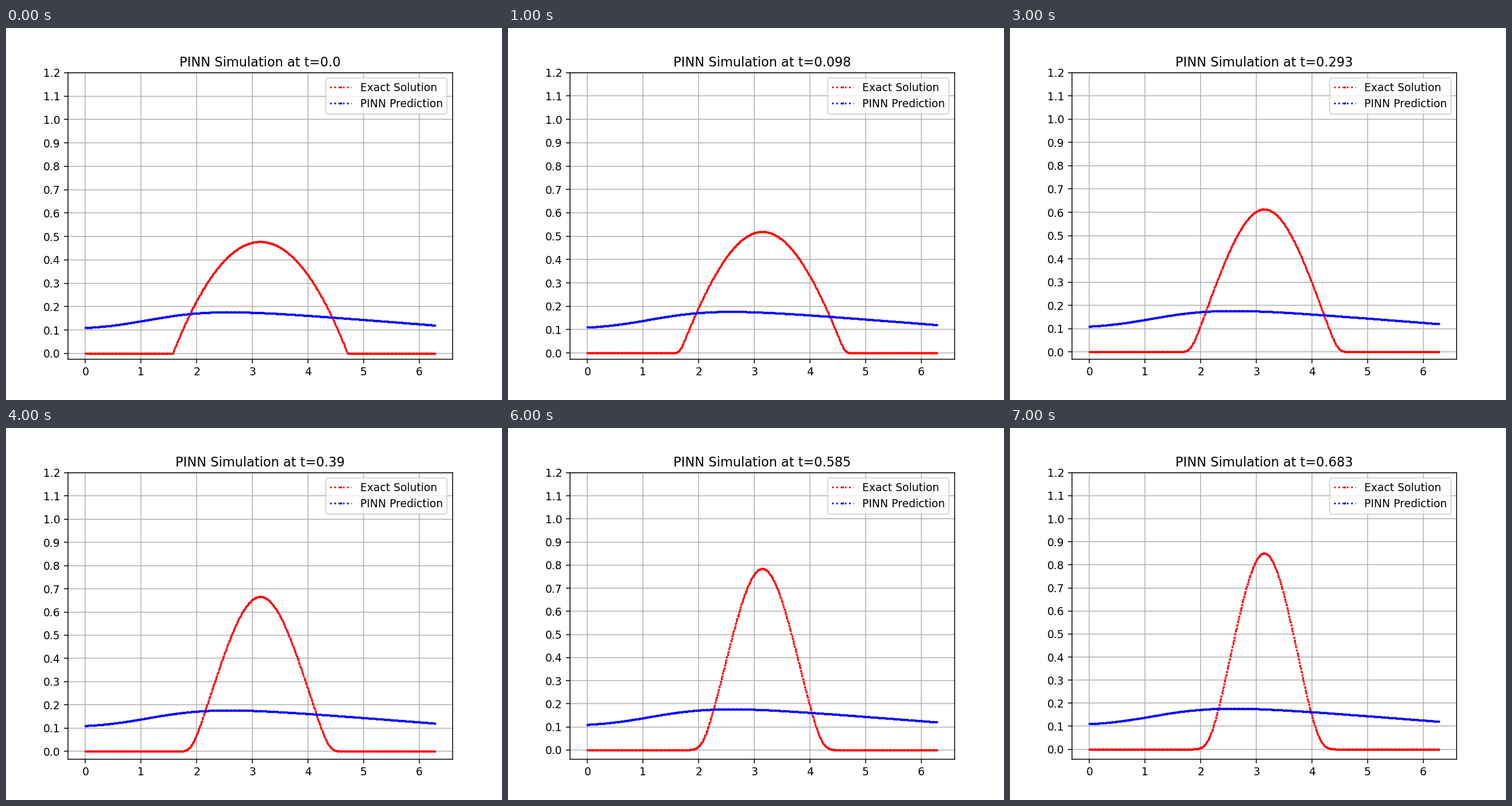
Recreate the animation shown at these times as a matplotlib script. Size 864 by 648 pixels, loop 8000 ms.

```python
import numpy as np
import matplotlib.pyplot as plt
from matplotlib.animation import FuncAnimation

STEP = 4 / 41        # simulated time between frames
FRAMES = 8
SPEED, DIFF = 0.871, 0.013
SUBSTEPS = 100

x = np.linspace(0, 2 * np.pi, 512)


def start_density():
    a = np.pi / 2
    return np.maximum(0, 3 / (4 * a) * (1 - ((x - np.pi) / a) ** 2))


def simulate():
    """Density drifting towards pi with a little diffusion."""
    dt = STEP / SUBSTEPS
    dx = x[1] - x[0]
    drift = SPEED * np.sin((x[1:] + x[:-1]) / 2)
    u = start_density()
    states = [u.copy()]
    for _ in range(FRAMES - 1):
        for _ in range(SUBSTEPS):
            flux = drift * (u[1:] + u[:-1]) / 2 - DIFF * np.diff(u) / dx
            u[1:-1] -= dt / dx * np.diff(flux)
        states.append(u.copy())
    return states


def prediction():
    """A smooth step on a gently falling line."""
    return 0.088 + 0.15 / (1 + np.exp(-1.6 * (x - 1.1))) - 0.0187 * x


exact = simulate()

fig, ax = plt.subplots(figsize=(6.4, 4.8), dpi=135)
style = dict(linestyle=":", marker=".", markersize=2)
red, = ax.plot(x, exact[0], color="red", label="Exact Solution", **style)
ax.plot(x, prediction(), color="blue", label="PINN Prediction", **style)
ax.set_yticks(np.arange(13) / 10)
ax.grid()
ax.legend(loc="upper right")


def draw(i):
    red.set_ydata(exact[i])
    ax.set_ylim(-0.05 * exact[i].max(), 1.2)
    ax.set_title(f"PINN Simulation at t={round(i * STEP, 3)}")


anim = FuncAnimation(fig, draw, frames=FRAMES, interval=1000,
                     init_func=lambda: draw(0), repeat=True, repeat_delay=0)
plt.show()
```
